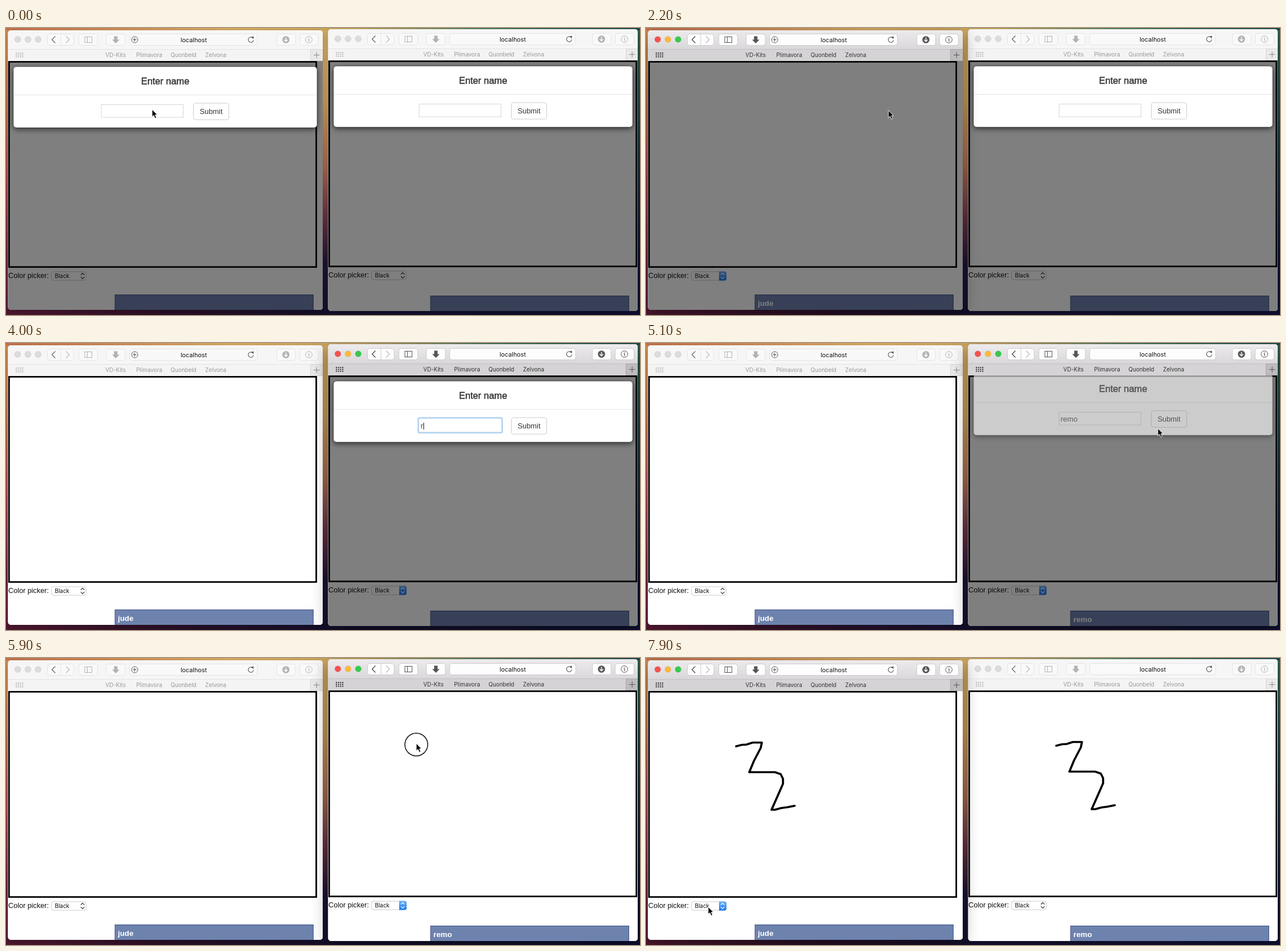
These frames come from a looping animation (1111 px wide and 504 px high, 8 s). An HTML page:

```html
<!DOCTYPE html>
<html lang="en">
<head>
<meta charset="utf-8">
<title>Shared drawing board</title>
<style>
html, body { margin: 0; width: 100%; height: 100%; overflow: hidden; }
body {
  background:
    linear-gradient(90deg, #c4704c, #d8aa62 35%, #c6a45c 55%, #4a7a5c 75%, #1d4a4a) 0 0 / 100% 4px no-repeat,
    linear-gradient(90deg, #501830, #2a1026 25%, #15102a 50%, #0d1030) 0 100% / 100% 9px no-repeat,
    linear-gradient(#2c5e50, #17343c 40%, #0d1030 80%) 100% 0 / 12px 100% no-repeat,
    linear-gradient(#d4ac66, #cb9a58 25%, #a86a4c 48%, #6c3344 65%, #201334 82%, #15102c) 550px 0 / 20px 100% no-repeat,
    linear-gradient(#cc8c50, #bd6a48 28%, #ac424a 52%, #6f1f38 80%, #501830);
}
svg { display: block; }
text { font-family: "Liberation Sans", Arial, sans-serif; }
.ui { font-family: Inter, "Open Sans", sans-serif; }
.mid { text-anchor: middle; }
.line { fill: none; stroke-linecap: round; stroke-linejoin: round; }
</style>
</head>
<body>
<svg id="stage" width="1111" height="504" viewBox="0 0 1111 504"></svg>
<script>
const LOOP = 8000, STEP = 100;
const stage = document.getElementById('stage');

// dx, dy: window position; d: how much narrower it is than the left one
const windows = [
  { id: 'a', dx: 0, dy: 0, d: 0, right: 555, top: 4, bottom: 495, barY: 468,
    name: 'jude', keys: [1200, 1350, 1450, 1550], focus: 600, submit: 1900,
    active: t => t >= 600 && t < 2900 || t >= 7600 },
  { id: 'b', dx: 561, dy: -1, d: 8, right: 546, top: 3, bottom: 498, barY: 471,
    name: 'remo', keys: [4000, 4200, 4350, 4500], focus: 2900, submit: 4980,
    active: t => t >= 2900 && t < 7600 }
];
const bookmarks = [[192, 'VD-Kits'], [251, 'Plimavora'], [311, 'Quonbeld'], [367.5, 'Zelvona']];

// Zigzag in left window coordinates
const stroke = [[158, 155], [168, 152.5], [176, 152], [187, 148.5], [203, 148.5], [201, 158],
  [189, 181], [181, 200.5], [226, 200.5], [236, 204], [240, 212], [240, 221], [233, 237],
  [220, 266.5], [226, 266.5], [237, 263.5], [248, 262], [260.5, 259.5]];
const drawStart = 5900, drawEnd = 6810;

const pointer = [[0, 256, 143], [1550, 256, 143], [1850, 358, 150], [2100, 358, 150],
  [2500, 785, 115], [2750, 800, 143], [4600, 800, 143], [4900, 897, 150], [5480, 897, 150],
  [5800, 719, 150], [drawStart, 719, 150], [7000, 821.5, 254.5], [7450, 109, 437], [LOOP, 109, 437]];
const hidden = [[900, 1550], [3700, 4550]];
const presses = [[500, 700], [1850, 2000], [2800, 3000], [4900, 5050], [5850, 6850], [7550, 7700]];

const clamp = v => Math.max(0, Math.min(1, v));
const within = (t, spans) => spans.some(([a, b]) => t >= a && t < b);
const rect = (x, y, w, h, fill, more = '') =>
  `<rect x="${x}" y="${y}" width="${w}" height="${h}" fill="${fill}" ${more}/>`;
const line = (d, color, width = 1) =>
  `<path class="line" d="${d}" stroke="${color}" stroke-width="${width}"/>`;
const disc = (x, y, r, fill, more = '') => `<circle cx="${x}" cy="${y}" r="${r}" fill="${fill}" ${more}/>`;
const label = (x, y, size, fill, str, cls = '', more = '') =>
  `<text x="${x}" y="${y}" font-size="${size}" fill="${fill}" class="${cls}" ${more}>${str}</text>`;
const shift = (x, y, body, more = '') => `<g transform="translate(${x} ${y})" ${more}>${body}</g>`;

// The first part of a polyline, measured by length
function partial(points, share) {
  const lengths = points.slice(1).map((p, i) => Math.hypot(p[0] - points[i][0], p[1] - points[i][1]));
  let left = share * lengths.reduce((a, b) => a + b);
  const out = [points[0]];
  for (let i = 0; i < lengths.length && left > 0; i++) {
    const k = Math.min(1, left / lengths[i]), [x, y] = points[i];
    out.push([x + (points[i + 1][0] - x) * k, y + (points[i + 1][1] - y) * k]);
    left -= lengths[i];
  }
  return out;
}
const drawn = t => partial(stroke, clamp((t - drawStart) / (drawEnd - drawStart)));

function toolbar(w, on) {
  const ink = on ? '#555' : '#b2b2b2', edge = on ? '#cdcbcd' : '#e4e4e4', face = on ? '#fdfdfd' : '#f9f9f9';
  const { d } = w;
  const button = (x, width) => rect(x, 10.5, width, 20, face, `rx="4" stroke="${edge}"`);
  const arrow = 'M0 6.5 L-6.5 0 H-3 V-6 H3 V0 H6.5 Z';
  const dots = [0, 1, 2].flatMap(r => [0, 1, 2, 3].map(c =>
    rect(17 + c * 3.7, 43 + r * 3.3, 2, 2, on ? '#333' : '#bbb'))).join('');
  const lights = (on ? ['#f8504f', '#fdb93c', '#35cb4b'] : ['#dcdcdc', '#dcdcdc', '#dcdcdc'])
    .map((c, i) => disc(20.5 + i * 17.9, 20, 5.3, c, `stroke="${on ? '#0002' : '#ccc'}" stroke-width=".7"`)).join('');
  const fieldWidth = 224 - d * .4;
  const hoverPlus = d ? '' : disc(225.5, 20.5, 5.5, 'none', 'stroke="#555"') +
    line('M222.7 20.5 h5.6 M225.5 17.7 v5.6', '#555');
  return rect(0, 0, 560, 37, on ? 'url(#bar)' : '#f6f6f6') +
    rect(0, 37, 560, 21, on ? '#d5d3d5' : '#f4f4f4') +
    rect(0, 37, 560, 1, on ? '#c3c1c3' : '#e3e3e3') + lights +
    button(72.5, 46.5) + line('M96 11 v19', edge) +
    line('M86 15 L80.5 20.5 L86 26', on ? '#444' : '#666', 1.3) +
    line('M105.5 15 L111 20.5 L105.5 26', '#bbb', 1.2) +
    button(127.5, 33) + rect(138, 15.5, 12.5, 10, 'none', `stroke="${ink}"`) + line('M142.5 15.5 v10', ink) +
    button(175.5, 33.5) + shift(192.3, 20.5, `<path d="${arrow}" fill="${ink}"/>`) +
    rect(216.5, 10.5, fieldWidth, 20, face, `rx="4" stroke="${edge}"`) + hoverPlus +
    label(329 - d / 4, 24.7, 10.8, '#111', 'localhost', 'ui mid') +
    shift(429 - d * .4, 20.5, line('M3.3 -3.2 A4.6 4.6 0 1 0 4.6 1', '#555', 1.1) +
      '<path d="M0 -4.2 L4.8 -6 V-1.6 Z" fill="#555"/>') +
    shift(-d, 0, button(474.5, 33) + disc(490.5, 20.5, 6.3, ink) +
      line('M490.5 17 v6 M487.8 21 l2.7 2.7 l2.7 -2.7', '#fff', 1.4) +
      button(514.5, 33) + disc(530.7, 20.5, 5.8, 'none', `stroke="${ink}"`) +
      line('M530 19.5 h1 v4 M530.7 17.3 v.2', ink, 1.2) +
      rect(533.5, 37.5, 23, 20, on ? '#bdbbbd' : '#e9e9e9', `stroke="${on ? '#aaa' : '#d8d8d8'}"`) +
      line('M539.5 47.5 h9.5 M544.2 42.8 v9.5', on ? '#555' : '#888')) +
    dots + bookmarks.map(([x, s]) =>
      label(x - d / 2, 51, 9.8, on ? '#333' : '#999', s, 'ui mid')).join('');
}

function picker(on) {
  const chevrons = line('M131.3 433.4 l2.9 -2.9 l2.9 2.9 M131.3 437.4 l2.9 2.9 l2.9 -2.9', on ? '#fff' : '#333', 1.2);
  return label(4, 438.6, 12.65, '#111', 'Color picker:') +
    rect(79.5, 428, 61, 15, '#fff', 'rx="3.5" stroke="#ccc"') +
    (on ? `<path d="M128 427.5 h9.5 a3.5 3.5 0 0 1 3.5 3.5 v9 a3.5 3.5 0 0 1 -3.5 3.5 h-9.5 z" fill="url(#blue)"/>` : '') +
    label(85.5, 439, 9.9, '#111', 'Black', 'ui') + chevrons;
}

function dialog(w, t) {
  const out = clamp((t - w.submit) / 300), dim = 1 - clamp((t - w.submit - 300) / 160);
  const typed = w.name.slice(0, w.keys.filter(k => t >= k).length);
  const focused = t >= w.focus && t < w.submit;
  // Caret stays solid while typing and blinks otherwise
  const caret = focused && (typed.length > 0 || (t - w.focus) % 1000 < 500);
  const field = focused ? rect(165.5, 132.5, 147, 26, '#fff', 'rx="2" stroke="#bcd8f2" stroke-width="3"')
    : rect(167, 134.5, 143.5, 22.5, '#fff', 'stroke="#d6d6d6"');
  const bar = caret ? `<tspan dx="-.5" dy="-.8" fill="#111" font-weight="100">|</tspan>` : '';
  const box = rect(13, 68, 532 - w.d, 107, '#fff',
    'rx="5" stroke="#0005" style="filter:drop-shadow(0 3px 5px #0009)"') +
    rect(13.5, 117, 531 - w.d, 1, '#e5e5e5') +
    shift(-w.d / 2, 0,
      label(279, 98.5, 16.35, '#333', 'Enter name', 'mid', 'stroke="#333" stroke-width=".45"') + field +
      label(169.5, 150.5, 13, '#444', typed + bar) +
      rect(328.5, 132, 62, 29, '#fff', 'rx="4" stroke="#ccc"') +
      label(359.5, 151.2, 12.85, '#333', 'Submit', 'mid'));
  return (dim ? rect(0, 58, 560, 445, '#000', `opacity="${dim / 2}"`) : '') +
    (out < 1 ? shift(0, -30 * out, box, `opacity="${1 - out}"`) : '');
}

function browser(w, t) {
  const on = w.active(t), height = w.bottom - w.top;
  const shape = fill => rect(3.5, w.top, w.right - 3.5, height, fill, 'rx="5"');
  const shadow = on ? '0 8px 14px #0006' : '0 4px 6px #0003';
  const ink = t >= drawStart ? line('M' + drawn(t).join('L'), '#000', 3.7) : '';
  const page = rect(0, 58, 560, 445, '#fff') + rect(5.3, 59.3, 538.4, 360.4, '#fff', 'stroke="#000" stroke-width="2.8"') +
    ink + picker(on) +
    shift(-w.d, w.barY, rect(191, .5, 347.5, 60, '#6e82ae', 'stroke="#40548a"') +
      (t >= w.submit ? label(196, 19.5, 13.3, '#fff', w.name, '', 'font-weight="bold"') : ''));
  return shift(w.dx, w.dy, `<clipPath id="${w.id}">${shape('#000')}</clipPath>` +
    `<g style="filter:drop-shadow(${shadow})">${shape('#fff')}</g>` +
    `<g clip-path="url(#${w.id})">${page}${dialog(w, t)}${toolbar(w, on)}</g>`);
}

function pointerAt(t) {
  if (t >= drawStart && t < 7000) {
    const [x, y] = drawn(t).pop();
    return [x + 561, y - 5];
  }
  const i = pointer.findIndex((p, n) => n && t < p[0]);
  const [t0, x0, y0] = pointer[i - 1].slice();
  const [t1, x1, y1] = pointer[i];
  const from = t0 === drawStart ? [x1, y1] : t1 === 7450 ? [821.5, 254.5] : [x0, y0];
  const k = clamp((t - t0) / (t1 - t0)), e = k * k * (3 - 2 * k);
  return [from[0] + (x1 - from[0]) * e, from[1] + (y1 - from[1]) * e];
}

function cursor(t) {
  if (within(t, hidden)) return '';
  const ring = within(t, presses) ? disc(0, 2, 20, 'none', 'stroke="#111" stroke-width="1.5"') : '';
  return shift(...pointerAt(t), ring +
    '<path d="M0 0 V13 L3 10.3 L5.2 15.5 L7.6 14.5 L5.4 9.4 H9 Z" fill="#000" stroke="#fff" stroke-width=".9"/>');
}

const defs = `<defs>
  <linearGradient id="bar" x2="0" y2="1"><stop stop-color="#efedef"/><stop offset="1" stop-color="#d9d7d9"/></linearGradient>
  <linearGradient id="blue" x2="0" y2="1"><stop stop-color="#6bb2fa"/><stop offset="1" stop-color="#1c79f1"/></linearGradient>
</defs>`;

let shown = -1;
function frame(now) {
  const t = Math.floor(now % LOOP / STEP) * STEP;
  if (t !== shown) {
    shown = t;
    // The active window lies on top
    const order = windows[1].active(t) ? windows : [...windows].reverse();
    stage.innerHTML = defs + order.map(w => browser(w, t)).join('') + cursor(t);
  }
  requestAnimationFrame(frame);
}
frame(performance.now());
</script>
</body>
</html>
```
